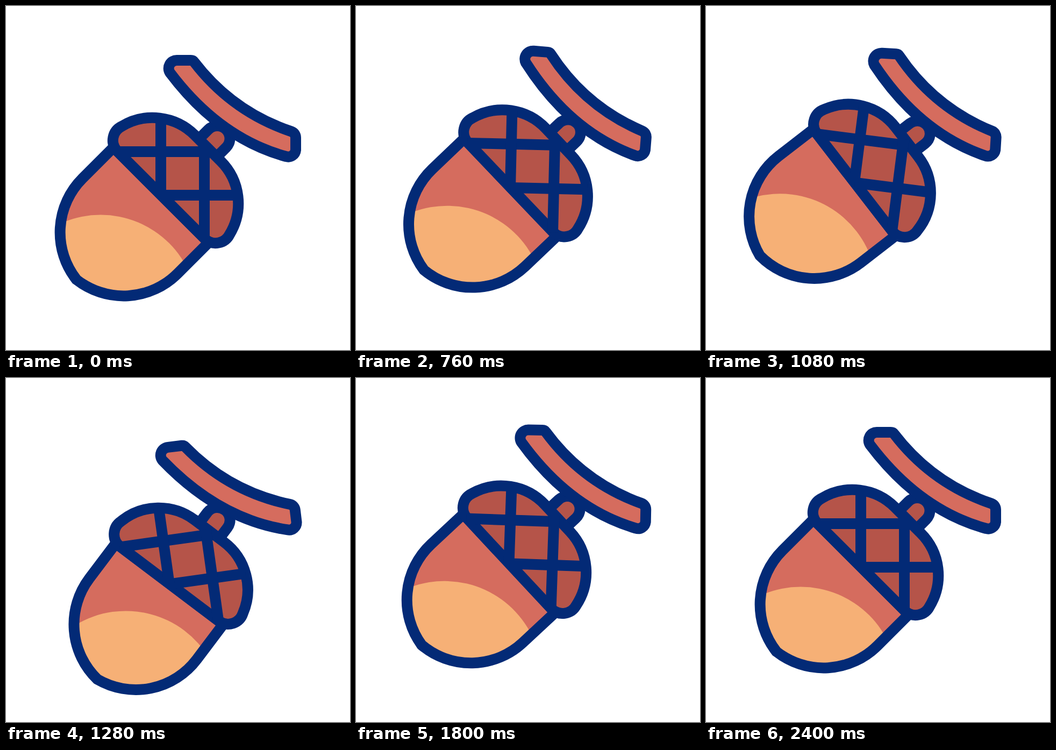
Recreate the animation shown at these times as an HTML page. Size 640x640 px, loop 2.6 s.

```html
<!DOCTYPE html>
<html lang="en">
<head>
<meta charset="utf-8">
<title>Swinging acorn</title>
<style>
  html, body { margin: 0; width: 100%; height: 100%; overflow: hidden; background: #fff; }
  svg { display: block; width: 100vw; height: 100vh; }
  .ink { stroke: #032a76; stroke-width: 20; stroke-linejoin: round; }
  .coral { fill: #d56c5e; }
  .brown { fill: #b55449; }
  .none { fill: none; }
</style>
</head>
<body>
<svg viewBox="0 0 640 640">
  <defs>
    <path id="nut" d="M200 263 L142 321 A142 142 0 0 0 131 509 A142 142 0 0 0 319 498 L377 440 Z"/>
    <path id="bands" d="M206 271 H380 M289 352 H431"/>
    <path id="stem" d="M393 246.5 l-28 28" stroke-linecap="round"/>
    <clipPath id="nutClip"><use href="#nut"/></clipPath>
  </defs>
  <g id="acorn">
    <use href="#stem" stroke="#032a76" stroke-width="67"/>
    <use href="#stem" stroke="#b55449" stroke-width="27"/>
    <use href="#nut" class="coral"/>
    <circle cx="176" cy="569" r="180.5" fill="#f6b076" clip-path="url(#nutClip)"/>
    <use href="#nut" class="ink none"/>
    <path class="ink brown" d="M206 269 A29 29 0 0 1 215 224 A111 111 0 0 1 351.5 240.5 l48 48 A111 111 0 0 1 416 425 A29 29 0 0 1 371 434 Z"/>
    <use href="#bands" class="ink"/>
    <!-- the same bands mirrored across the acorn's axis -->
    <use href="#bands" class="ink" transform="matrix(0 -1 -1 0 640 640)"/>
  </g>
  <path id="branch" class="ink coral" d="M318 101 H344 Q348 101 350 104 Q421 196.6 531 233.5 A12 12 0 0 1 539 245 V268 A14 14 0 0 1 521 280 Q397 246 305 124 A15 15 0 0 1 318 101 Z"/>
</svg>
<script>
  const LOOP = 2600, STEP = 40, START = 200, END = 2400;
  const branch = document.getElementById('branch');
  const acorn = document.getElementById('acorn');

  // Eases through evenly spaced turning angles; a lower power hurries the later swings sooner.
  function swing(u, turns, power) {
    const angles = [0, ...turns, 0];
    const last = angles.length - 1;
    const phase = last * u + 2 * u ** power * (1 - u);
    const i = Math.min(Math.floor(phase), last - 1);
    const ease = (1 - Math.cos(Math.PI * (phase - i))) / 2;
    return angles[i] + (angles[i + 1] - angles[i]) * ease;
  }

  function draw(ms) {
    const t = Math.floor((ms % LOOP) / STEP) * STEP;
    const u = Math.min(1, Math.max(0, (t - START) / (END - START)));
    const tilt = swing(u, [-6.6, 12.5, -7, 8.5, -3.5], 3);
    const hang = swing(u, [-16.2, 16, -8, 7.7, -4.7], 5);
    const sway = `rotate(${tilt} 543 255)`;
    branch.setAttribute('transform', sway);
    acorn.setAttribute('transform', `${sway} rotate(${hang - tilt} 395 240)`);
  }

  let start;
  function tick(now) {
    start ??= now;
    draw(now - start);
    requestAnimationFrame(tick);
  }
  draw(0);
  requestAnimationFrame(tick);
</script>
</body>
</html>
```
